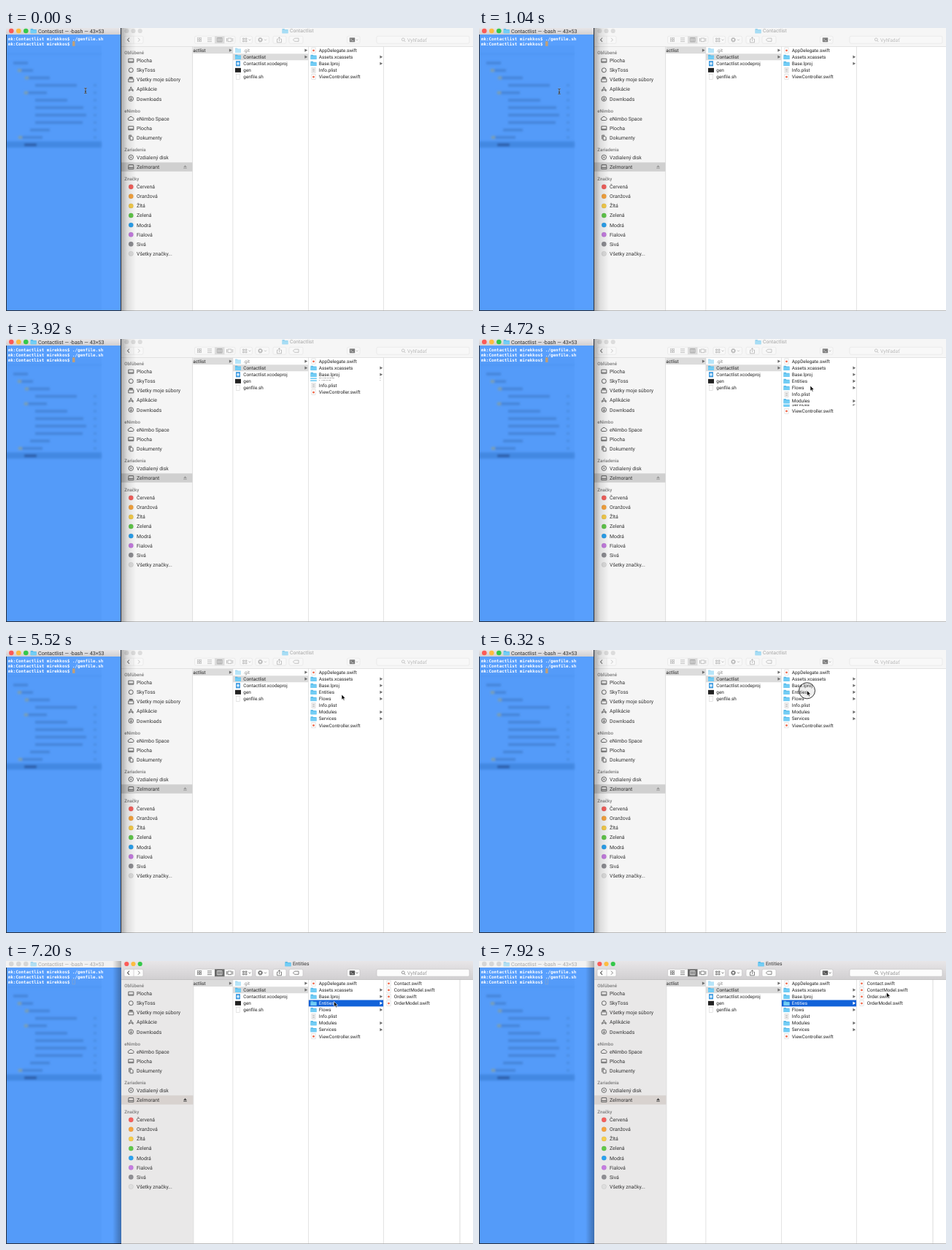
Write an HTML page that moves like this. It is 640 px wide and 388 px high and loops after 8000 ms.

```html
<!DOCTYPE html>
<html lang="sk">
<head>
<meta charset="utf-8">
<title>Generovanie súborov</title>
<style>
html, body { margin: 0; width: 100%; height: 100%; overflow: hidden; background: #fff; }
svg { display: block; width: 640px; height: 388px; }
text { font-family: Roboto, "Open Sans", sans-serif; text-rendering: geometricPrecision; white-space: pre; }
.mono { font: bold 5.85px "DejaVu Sans Mono", "Liberation Mono", monospace; fill: #fff; }
</style>
</head>
<body>
<svg viewBox="0 0 640 388">
  <defs>
    <filter id="blur" x="-10%" y="-10%" width="120%" height="120%"><feGaussianBlur stdDeviation="1.6"/></filter>
    <linearGradient id="bar" x2="0" y2="1"><stop stop-color="#e8e6e8"/><stop offset="1" stop-color="#d1cfd1"/></linearGradient>
    <linearGradient id="shade"><stop stop-color="#000" stop-opacity="0"/><stop offset="1" stop-color="#000" stop-opacity=".3"/></linearGradient>
    <linearGradient id="cast">
      <stop stop-color="#000" stop-opacity=".3"/><stop offset=".4" stop-color="#000" stop-opacity=".1"/><stop offset="1" stop-color="#000" stop-opacity="0"/>
    </linearGradient>
  </defs>
  <g id="backdrop"></g>
  <g id="scene"></g>
</svg>
<script>
const LOOP = 8000, STEP = 80, ROW = 9.08;
const PROMPT = 'mk:Contactlist mirekkos$ ', COMMAND = './genfile.sh';
const LIGHTS = ['#fc5b57', '#fdbc40', '#34c84a'];

const clamp = v => Math.max(0, Math.min(1, v));
const rect = (x, y, w, h, fill, more = '') => `<rect x="${x}" y="${y}" width="${w}" height="${h}" fill="${fill}" ${more}/>`;
const circle = (x, y, r, fill, more = '') => `<circle cx="${x}" cy="${y}" r="${r}" fill="${fill}" ${more}/>`;
const path = (d, fill, more = '') => `<path d="${d}" fill="${fill}" ${more}/>`;
const line = (d, color, width = .8) => path(d, 'none', `stroke="${color}" stroke-width="${width}"`);
const label = (x, y, s, size = 6.4, fill = '#222', more = '') =>
  `<text x="${x}" y="${y + size * .36}" font-size="${size}" fill="${fill}" ${more}>${s}</text>`;
const at = (x, y, body, more = '') => `<g transform="translate(${x} ${y})" ${more}>${body}</g>`;

const folder = (x, y, opacity = 1) => at(x, y,
  path('M-4-3h3l.8.9H4V3.2H-4z', '#55b8e8') + rect(-4, -1.3, 8, 4.5, '#72cdf5'), `opacity="${opacity}"`);
const page = (body, fill = '#fff') => rect(-2.6, -3.6, 5.2, 7.2, fill, 'stroke="#ccc" stroke-width=".5"') + body;
const fileIcons = {
  swift: page(circle(0, .2, 1.4, '#f0684a')),
  plist: page(line('M-1.5-1.5h3M-1.5 0h3M-1.5 1.5h3', '#aaa', .6), '#f4f4f4'),
  sh: page(''),
  project: rect(-3, -3.6, 6, 7.2, '#3f9be0') + circle(0, 0, 2, '#cfe8fa'),
  exec: rect(-4, -3, 8, 6, '#222')
};

const sideIcons = {
  desk: 'M-3.5-2.5h7v5h-7zM-3.5 1.3h7',
  ring: 'M-3 0a3 3 0 1 0 6 0a3 3 0 1 0-6 0',
  all: 'M-3.5-1h7v4h-7zM-3-2.3h6M-2.3-3.5h4.6',
  apps: 'M-2.8 3L0-3.2 2.8 3M-3.7 1h7.4',
  down: 'M-3.2 0a3.2 3.2 0 1 0 6.4 0a3.2 3.2 0 1 0-6.4 0M0-2V1.8M-1.6.2L0 1.8 1.6.2',
  cloud: 'M-2.3 2.3a1.7 1.7 0 0 1-.2-3.4a2.5 2.5 0 0 1 4.6-.3a1.9 1.9 0 0 1 .4 3.7z',
  docs: 'M-1.2-2h2.6l1.4 1.4v4h-4zM-2.6 2v-5.3H.8',
  disc: 'M-3.2 0a3.2 3.2 0 1 0 6.4 0a3.2 3.2 0 1 0-6.4 0M-.7 0a.7.7 0 1 0 1.4 0a.7.7 0 1 0-1.4 0',
  drive: 'M-3.2-2.8h6.4l.4 4v1.8h-7.2V1.2zM-3.6 1.2h7.2'
};
const sidebar = [
  [34, 'Obľúbené', [['Plocha', 'desk'], ['SkyToss', 'ring'], ['Všetky moje súbory', 'all'], ['Aplikácie', 'apps'], ['Downloads', 'down']]],
  [113.5, 'eNimbo', [['eNimbo Space', 'cloud'], ['Plocha', 'desk'], ['Dokumenty', 'docs']]],
  [166.5, 'Zariadenia', [['Vzdialený disk', 'disc'], ['Zelmorant', 'drive']]],
  [207, 'Značky', [['Červená', '#f5605c'], ['Oranžová', '#f7a43d'], ['Žltá', '#f6cd4a'], ['Zelená', '#60c94a'],
    ['Modrá', '#2aa2f0'], ['Fialová', '#c67ce2'], ['Sivá', '#8e8e93'], ['Všetky značky...', '#dedede']]]
];

// Each row: name, icon, [start, length] of its slide-in
const project = [['.git', 'folder'], ['Contactlist', 'folder'], ['Contactlist.xcodeproj', 'project'], ['gen', 'exec'], ['genfile.sh', 'sh']];
const app = [['AppDelegate.swift', 'swift'], ['Assets.xcassets', 'folder'], ['Base.lproj', 'folder'],
  ['Entities', 'folder', [3840, 240]], ['Flows', 'folder', [3840, 240]], ['Info.plist', 'plist'],
  ['Modules', 'folder', [4240, 240]], ['Services', 'folder', [4600, 240]], ['ViewController.swift', 'swift']];
const entities = ['Contact', 'ContactModel', 'Order', 'OrderModel'].map(n => [n + '.swift', 'swift']);

const triangle = (x, y, fill) => path(`M${x - 1.6} ${y - 2.1}l3.7 2.1l-3.7 2.1z`, fill);

function column(x, width, rows, t, selected, color) {
  let depth = -1;
  const items = rows.map(([name, icon, slide]) => {
    const shown = slide ? clamp((t - slide[0]) / slide[1]) : 1;
    depth += shown;
    if (!shown) return '';
    const y = 30.6 + depth * ROW, on = name === selected, blue = on && color !== '#dcdcdc';
    const hidden = name[0] === '.', ink = blue ? '#fff' : hidden ? '#8a8a8a' : '#222';
    const body = icon === 'folder'
      ? folder(x + 7, y, hidden ? .5 : 1) + triangle(x + width - 3.5, y, blue ? '#fff' : '#6c6c6c')
      : at(x + 7, y, fileIcons[icon]);
    return rect(x, y - ROW / 2, width, ROW, on ? color : '#fff') + body + label(x + 14.3, y, name, 6.4, ink);
  });
  // Upper rows cover the ones sliding out below them
  return items.reverse().join('');
}

function drawSidebar(active) {
  const width = active ? 98.5 : 97.5;
  let s = rect(158, 25, width, 363, active ? '#e9e8e8' : '#f5f5f5')
    + rect(158, 184.3, width, 12.4, active ? '#d8d2cf' : '#d0d0d0');
  for (const [top, title, items] of sidebar) {
    s += label(162.3, top, title, 6.2, '#7c7c7c', 'font-weight="500"');
    items.forEach(([name, icon], i) => {
      const y = top + 10.7 + i * 13.1;
      s += icon[0] === '#' ? circle(171.3, y, 3.2, icon, 'stroke="#0002" stroke-width=".5"') : at(171.3, y, line(sideIcons[icon], '#686868', 1));
      s += label(179, y, name, 6.9, '#333');
    });
  }
  const eject = active ? '#444' : '#999';
  return s + path('M243.2 191l2.3-3 2.3 3z', eject) + rect(243.2, 191.8, 4.6, .9, eject);
}

function toolbar(active) {
  const ink = active ? '#666' : '#b4b4b4', edge = active ? '#c0bec0' : '#e2e2e2', face = active ? '#fcfcfc' : '#f8f8f8';
  const strong = active ? '#555' : '#7c7c7c';
  const button = (x, w) => rect(x, 11.2, w, 10, face, `rx="1.8" stroke="${edge}" stroke-width=".6"`);
  const stroke = d => line(d, ink, .8);
  const buttons = [[162, 26], [258.5, 55.5], [321, 16.5], [342, 18.5], [366, 18], [388, 19], [467.5, 17.5], [508, 127]];
  let s = buttons.map(b => button(...b)).join('');
  s += rect(286, 11.2, 13.5, 10, active ? '#6a6a6a' : '#dcdcdc');
  s += line('M169 13.5l-2.5 2.7 2.5 2.7', strong, 1.1) + stroke('M181 13.7l2.4 2.5-2.4 2.5') + line('M175 11.2v10', edge, .6);
  for (let i = 0; i < 4; i++) s += rect(262.3 + i % 2 * 3.2, 13.3 + (i >> 1) * 3.2, 2.2, 2.2, 'none', `stroke="${ink}" stroke-width=".6"`);
  s += stroke('M276 13.8h6M276 16.2h6M276 18.6h6');
  s += line('M289.5 13.5h6.5v5.4h-6.5zM291.7 13.5v5.4M293.9 13.5v5.4', active ? '#fff' : '#999', .7);
  s += stroke('M304 14h5v4.6h-5zM302.5 14v4.6M310.8 14v4.6');
  s += stroke('M324.5 14h2v1.6h-2zM328 14h2v1.6h-2zM324.5 17.2h2v1.6h-2zM328 17.2h2v1.6h-2z');
  s += circle(348.5, 16.2, 2, 'none', `stroke="${ink}" stroke-width="1.2"`)
    + circle(348.5, 16.2, 3, 'none', `stroke="${ink}" stroke-width=".9" stroke-dasharray="1.2 1.156"`);
  s += [334, 355.5, 481].map(x => stroke(`M${x - 1.4} 15.6l1.4 1.4 1.4-1.4`)).join('');
  s += stroke('M373 15.2h-1.5v4.6h6v-4.6H376M374.5 18v-5.3M372.8 14.2l1.7-1.6 1.7 1.6');
  s += stroke('M393.5 16.2l2-2.1h5.5v4.2h-5.5z');
  s += rect(470.8, 13.2, 7.4, 6, strong, 'rx=".6"') + line('M472.2 14.8l1.3 1.2-1.3 1.2M474.2 17.5h2', '#fff', .6);
  s += circle(544.3, 15.8, 1.9, 'none', `stroke="${ink}" stroke-width=".7"`) + stroke('M545.7 17.2l1.7 1.8');
  return s + label(550, 16.2, 'Vyhľadať', 6.7, active ? '#999' : '#bbb');
}

function finder(t) {
  const active = t >= 6480, opened = t >= 7040, blue = '#1262d9';
  let s = rect(158, 0, 482, 388, '#fff') + drawSidebar(active);
  s += rect(256.5, 26, 54.5, ROW, '#dcdcdc') + label(256.3, 30.6, 'actlist') + triangle(307.5, 30.6, '#6c6c6c');
  s += column(311, 103.5, project, t, 'Contactlist', active && !opened ? blue : '#dcdcdc');
  s += column(414.5, 103, app, t, opened ? 'Entities' : '', blue);
  if (opened) s += column(517.5, 104, entities, t) + rect(621.5, 25, 1, 363, '#dcdcdc');
  for (const x of [311, 414.5, 517.5]) s += rect(x - .5, 25, .8, 363, '#dcdcdc');
  s += rect(active ? 256.5 : 255.3, 25, .8, 363, '#d4d4d4');
  s += rect(158, 0, 482, 25.3, active ? 'url(#bar)' : '#f6f6f6') + rect(158, 25, 482, .7, active ? '#b5b5b5' : '#d9d9d9');
  s += LIGHTS.map((c, i) => circle(165.3 + i * 9.2, 4, 3.1, active ? c : '#dcdcdc')).join('');
  const tx = opened ? 393 : 389;
  s += folder(tx - 6.5, 4, active ? 1 : .6) + label(tx, 4, opened ? 'Entities' : 'Contactlist', 6.8, active ? '#333' : '#a5a5a5');
  return s + toolbar(active) + rect(158, 387.2, 482, .8, '#aaa');
}

function typed(t) {
  const keys = [1120, 1200, 1440, 1520, 1600, 1760];
  return t >= 1920 ? COMMAND : COMMAND.slice(0, keys.filter(k => t >= k).length);
}

function terminal(t) {
  const active = t < 6480, running = t >= 2320 && t < 3360, edge = '#27303f';
  const lines = [PROMPT + COMMAND, PROMPT + typed(t)];
  if (t >= 2320) lines.push(running ? '' : PROMPT);
  const last = lines.length - 1;
  let s = rect(0, 0, 158, 9, active ? 'url(#bar)' : '#f2f2f2');
  s += LIGHTS.map((c, i) => circle(7.3 + i * 10, 4, 3.3, active ? c : '#d6d6d6')).join('');
  s += folder(37.7, 4, active ? 1 : .5)
    + label(44, 4, `Contactlist — ${running ? 'gen • ' : ''}-bash — 43×53`, 7.2, active ? '#333' : '#aaa');
  s += rect(3 + lines[last].length * 3.522, 18.2 + (last - 1) * 7.1, 3.5, 6.6, active ? '#d3a062' : 'none',
    active ? 'opacity=".85"' : 'stroke="#9aa8b8" stroke-width=".5"');
  s += lines.map((text, i) => `<text class="mono" x="3" y="${16.6 + i * 7.1}">${text}</text>`).join('');
  s += rect(0, 9, 1, 379, edge) + rect(0, 387, 158, 1, edge);
  return s + (active ? rect(157, 0, 1, 388, edge) + rect(158, 0, 20, 388, 'url(#cast)') : rect(146, 0, 12, 388, 'url(#shade)'));
}

const route = [[0, 109, 86], [320, 110, 87], [4240, 110, 87], [4400, 230, 82], [4560, 360, 91], [4720, 454, 64],
  [5120, 454, 64], [5520, 460, 61], [5920, 449.5, 55.5], [7200, 449.5, 55.5], [7520, 520, 50], [7920, 558.5, 43]];
function position(t) {
  const i = route.findIndex(p => p[0] > t);
  if (i < 0) return route.at(-1).slice(1);
  const [a, b] = [route[i - 1], route[i]], k = (t - a[0]) / (b[0] - a[0]);
  return [a[1] + (b[1] - a[1]) * k, a[2] + (b[2] - a[2]) * k];
}

function pointer(t) {
  if (t >= 1120 && t < 4240) return '';
  const [x, y] = position(t);
  if (x < 158) {
    const beam = 'M-1.6-3.6Q0-3.6 0-2.6V2.6Q0 3.6-1.6 3.6M1.6-3.6Q0-3.6 0-2.6M0 2.6Q0 3.6 1.6 3.6M-1 1h2';
    return at(x, y, line(beam, '#fff8', 1.6) + line(beam, '#111', .8));
  }
  const click = t >= 6240 && t < 6480 || t >= 6960 && t < 7200;
  return (click ? circle(449.5, 55.8, 11, '#8882', 'stroke="#222" stroke-width=".9"') : '')
    + at(x, y, path('M0 0V7.2L1.7 5.7 2.8 8.2 4 7.7 2.9 5.2H5.2z', '#000', 'stroke="#fff" stroke-width=".6"'));
}

// Blurred file tree showing through the terminal: [left, right] per line
const tree = [[10, 30], [16, 37], [26, 60], [40, 97], [25, 56], [40, 84], [40, 106], [40, 110], [40, 105], [33, 60], [17, 50], [25, 42]];
document.getElementById('backdrop').innerHTML = rect(0, 0, 158, 388, '#589ffd') + rect(0, 24, 131, 364, '#549bf9')
  + '<g filter="url(#blur)">' + rect(-4, 155.5, 135, 8.5, '#4288e2') + rect(0, 35, 131, 1.5, '#4d93f0')
  + tree.map(([a, b], i) => {
    const y = 48 + i * 10.2;
    return rect(a, y - 1.8, b - a, 3.6, i === 11 ? '#2b5ca6' : '#4484d8')
      + ([1, 2, 4, 10].includes(i) ? rect(a, y - 2, 5, 4, '#7d9fae') : '') + (i > 2 && i < 11 ? rect(120, y - 1.5, 4, 3, '#4a8ce2') : '');
  }).join('') + '</g>';

const scene = document.getElementById('scene'), start = performance.now();
let shown = -1;
function frame() {
  const t = Math.floor((performance.now() - start) % LOOP / STEP) * STEP;
  if (t !== shown) {
    shown = t;
    scene.innerHTML = finder(t) + terminal(t) + pointer(t);
  }
  requestAnimationFrame(frame);
}
frame();
</script>
</body>
</html>
```
